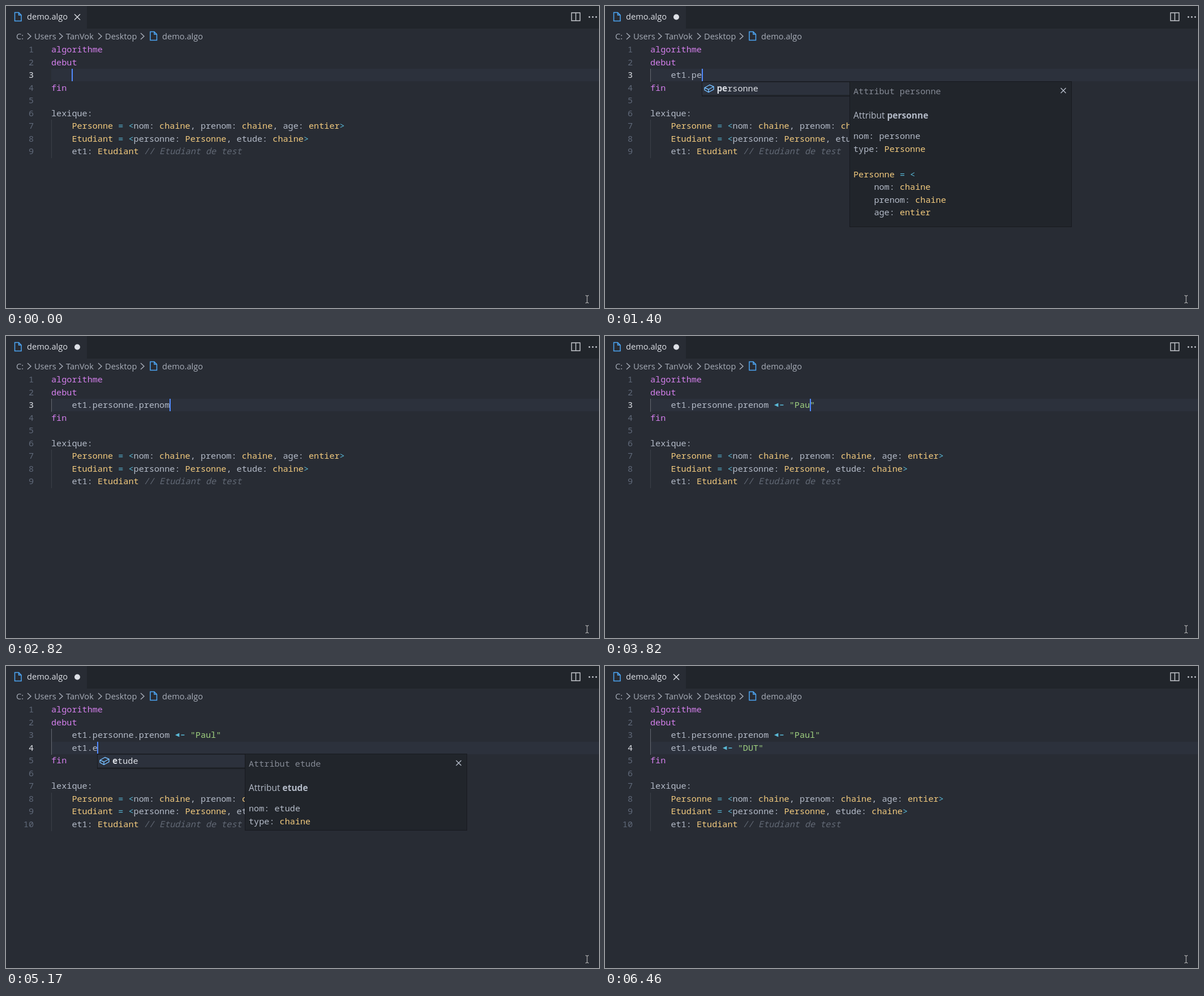
These frames come from a looping animation (1048x534 px, 6560 ms). An HTML page with a canvas:

```html
<!DOCTYPE html>
<html lang="fr">
<head>
<meta charset="utf-8">
<title>Autocompletion</title>
<style>
  html, body { margin: 0; width: 100%; height: 100%; overflow: hidden; background: #282c34; }
  canvas { display: block; }
</style>
</head>
<body>
<canvas id="stage" width="1048" height="534"></canvas>
<script>
const ctx = document.getElementById('stage').getContext('2d');
const LOOP = 6560, CHAR = 9.1, ROW = 22.5, LEFT = 80, TOP = 66;
const MONO_FAMILY = '"Noto Sans Mono", monospace';
const MONO = '500 15.17px ' + MONO_FAMILY;
const MONO_BOLD = 'bold 15.17px ' + MONO_FAMILY;
const UI = '"Open Sans", sans-serif';
const C = {
  bg: '#282c34', dark: '#21252b', line: '#2c313c', text: '#b4bbc8', bright: '#dde0e6',
  dim: '#858a95', keyword: '#d47fec', type: '#f2ca7e', op: '#5abbd9', string: '#9fd07f',
  comment: '#626975', number: '#5f6878', blue: '#4da6f5', border: '#181a1f'
};

// Completion entries: kind, documentation lines
const entries = {
  entier: ['Type', 'nom: entier', 'description: // Nombre entier'],
  Etudiant: ['Type'],
  ecrire: ['Template'],
  et1: ['Variable', 'nom: et1', 'type: Etudiant', 'description: // Etudiant de test', '',
    'Etudiant = <', '    personne: Personne', '    etude: chaine'],
  etude: ['Attribut', 'nom: etude', 'type: chaine'],
  personne: ['Attribut', 'nom: personne', 'type: Personne', '',
    'Personne = <', '    nom: chaine', '    prenom: chaine', '    age: entier'],
  age: ['Attribut', 'nom: age', 'type: entier'],
  nom: ['Attribut', 'nom: nom', 'type: chaine'],
  prenom: ['Attribut', 'nom: prenom', 'type: chaine']
};
const menus = {
  e: ['entier', 'et1', 'ecrire', 'Etudiant'],
  et: ['et1', 'Etudiant', 'entier'],
  student: ['etude', 'personne'],
  person: ['age', 'nom', 'prenom'],
  personne: ['personne'],
  etude: ['etude']
};

// Start time, edited text ("|" is the caret), menu, selected entry, documentation open
const done = 'et1.personne.prenom <- "Paul"\n';
const steps = [
  [0, '|'],
  [100, 'e|', 'e', 0, true],
  [300, 'et|', 'et', 0, true],
  [600, 'et1|'],
  [800, 'et1.|', 'student', 0, false],
  [900, 'et1.|', 'student', 0, true],
  [1100, 'et1.p|', 'personne', 0, true],
  [1300, 'et1.pe|', 'personne', 0, true],
  [1600, 'et1.personne|'],
  [1920, 'et1.personne.|', 'person', 0, false],
  [2020, 'et1.personne.|', 'person', 0, true],
  [2220, 'et1.personne.|', 'person', 1, true],
  [2420, 'et1.personne.|', 'person', 2, true],
  [2720, 'et1.personne.prenom|'],
  [2920, 'et1.personne.prenom |'],
  [3020, 'et1.personne.prenom <|'],
  [3120, 'et1.personne.prenom <-|'],
  [3320, 'et1.personne.prenom <- |'],
  [3420, 'et1.personne.prenom <- "|"'],
  [3620, 'et1.personne.prenom <- "P|"'],
  [3720, 'et1.personne.prenom <- "Pa|"'],
  [3820, 'et1.personne.prenom <- "Pau|"'],
  [3950, 'et1.personne.prenom <- "Paul|"'],
  [4050, 'et1.personne.prenom <- "Paul"|'],
  [4150, done + '|'],
  [4350, done + 'e|', 'e', 0, true],
  [4450, done + 'et|', 'et', 0, true],
  [4670, done + 'et1|'],
  [4870, done + 'et1.|', 'student', 0, false],
  [4970, done + 'et1.|', 'student', 0, true],
  [5070, done + 'et1.e|', 'etude', 0, false],
  [5170, done + 'et1.e|', 'etude', 0, true],
  [5270, done + 'et1.et|', 'etude', 0, true],
  [5370, done + 'et1.etude|'],
  [5470, done + 'et1.etude |'],
  [5570, done + 'et1.etude <|'],
  [5670, done + 'et1.etude <-|'],
  [5770, done + 'et1.etude <- |'],
  [5870, done + 'et1.etude <- "|"'],
  [5970, done + 'et1.etude <- "D|"'],
  [6070, done + 'et1.etude <- "DU|"'],
  [6170, done + 'et1.etude <- "DUT|"'],
  [6360, done + 'et1.etude <- "DUT"']
];

const icons = {
  cube: new Path2D('M-8-1L1-6L8-3V2L-1 7L-8 3ZM-8-1L-1 2L8-3M-1 2V7'),
  tree: new Path2D('M-7-2L-2-7L1-4L-4 1ZM-1-1H4M1-1V5H4M4-1l2-2 2 2-2 2zM4 5l2-2 2 2-2 2z'),
  brackets: new Path2D('M-5-5H-8V5H-5M5-5H8V5H5M-4 0L1-3L4-1V1L-1 4L-4 2ZM-4 0L-1 1L4-1'),
  square: new Path2D('M-7-7H7V7H-7Z'),
  file: new Path2D('M-5.5-7.5H1.5L6-3V7.5H-5.5ZM1.5-7.5V-3H6'),
  close: new Path2D('M-5-5L5 5M5-5L-5 5'),
  smallClose: new Path2D('M-4.5-4.5L4.5 4.5M4.5-4.5L-4.5 4.5'),
  chevron: new Path2D('M-3-5.5L3 0L-3 5.5'),
  split: new Path2D('M-7.5-7H7.5V7H-7.5ZM0-7V7'),
  beam: new Path2D('M-3-6.5H-1L0-5.5L1-6.5H3M0-5.5V5.5M-3 6.5H-1L0 5.5L1 6.5H3')
};
const kindIcons = {
  Attribut: ['cube', '#75beff'], Type: ['tree', '#ee9d28'],
  Variable: ['brackets', '#75beff'], Template: ['square', '#d8d8d8']
};

function rect(x, y, w, h, color) {
  ctx.fillStyle = color;
  ctx.fillRect(x, y, w, h);
}
function frame(x, y, w, h) {
  rect(x, y, w, h, C.border);
  rect(x + 1, y + 1, w - 2, h - 2, C.dark);
}
function dot(x, y, r, color) {
  ctx.fillStyle = color;
  ctx.beginPath();
  ctx.arc(x, y, r, 0, 7);
  ctx.fill();
}
function icon(name, x, y, color, width = 1.4) {
  ctx.save();
  ctx.translate(x, y);
  ctx.strokeStyle = color;
  ctx.lineWidth = width;
  if (name === 'square') ctx.setLineDash([1.5, 1]);
  ctx.stroke(icons[name]);
  ctx.restore();
}
function label(text, x, y, color, font = MONO, align = 'left') {
  ctx.font = font;
  ctx.fillStyle = color;
  ctx.textAlign = align;
  ctx.fillText(text, x, y);
}

function arrow(x, y) {
  ctx.fillStyle = C.op;
  ctx.beginPath();
  ctx.moveTo(x + 0.5, y - 5);
  ctx.lineTo(x + 8, y - 8.5);
  ctx.lineTo(x + 8, y - 1.5);
  ctx.fill();
  ctx.fillRect(x + 11, y - 5.7, 6, 1.5);
}

const tokens = /\/\/.*|"[^"]*"|<-|[<>=]|\w+|[^\w\s]/g;
function tokenColor(token) {
  if (token.startsWith('//')) return C.comment;
  if (token[0] === '"') return C.string;
  if (/^[<>=]/.test(token)) return C.op;
  if (/^(algorithme|debut|fin)$/.test(token)) return C.keyword;
  if (/^(Personne|Etudiant|chaine|entier)$/.test(token)) return C.type;
  return C.text;
}
function code(text, x, y) {
  for (const match of text.matchAll(tokens)) {
    const token = match[0], tx = x + match.index * CHAR;
    if (token === '<-') arrow(tx, y);
    else label(token, tx, y, tokenColor(token), (token.startsWith('//') ? 'italic ' : '') + MONO);
  }
}

function drawHeader(dirty) {
  rect(0, 0, 1048, 40, C.dark);
  rect(0, 0, 143, 40, C.bg);
  icon('file', 21, 19, C.blue, 1.5);
  label('demo.algo', 37, 24, C.bright, '14.6px ' + UI);
  if (dirty) dot(126, 19.5, 5, C.bright);
  else icon('close', 126, 19.5, C.bright);
  icon('split', 1007, 19, '#c5c8ce');
  for (const x of [1031, 1037, 1043]) dot(x, 19.5, 1.4, '#c5c8ce');

  const crumbs = [['C:', 18], ['Users', 50], ['TanVok', 106], ['Desktop', 175], ['demo.algo', 276]];
  for (const [text, x] of crumbs) label(text, x, 59, '#a8aeb9', '14.6px ' + UI);
  for (const x of [41, 97, 166, 241]) icon('chevron', x, 53.5, '#a8aeb9');
  icon('file', 260.5, 53, C.blue, 1.5);
}

function drawDoc(x, y, name) {
  const [kind, ...lines] = entries[name];
  const height = lines.length > 2 ? 258 : 136;
  frame(x, y, 393, height);
  label(kind + ' ' + name, x + 7, y + 23, C.dim);
  icon('smallClose', x + 378, y + 16.5, C.text);
  label(kind + ' ', x + 7, y + 65.5, C.text, '15.5px ' + UI);
  label(name, x + 7 + ctx.measureText(kind + ' ').width, y + 65.5, C.text, 'bold 15.5px ' + UI);
  lines.forEach((line, i) => code(line, x + 7, y + 102 + i * ROW));
}

function drawMenu(x, y, items, selected, open, prefix) {
  frame(x, y, 262, items.length * ROW + 4.5);
  items.forEach((name, i) => {
    const top = y + 2 + i * ROW, kind = entries[name][0], [shape, tint] = kindIcons[kind];
    if (i === selected) rect(x + 1, top, 260, 22, C.line);
    icon(shape, x + 13, top + 10.5, tint);
    const color = i === selected ? C.bright : C.text;
    const hit = name.toLowerCase().startsWith(prefix) ? prefix.length : 0;
    label(name.slice(0, hit), x + 27, top + 16, C.bright, MONO_BOLD);
    label(name.slice(hit), x + 27 + hit * CHAR, top + 16, color);
    if (kind === 'Template')
      label('Template de [ecri…', x + 110, top + 15.5, C.dim, '12.9px ' + MONO_FAMILY);
  });
  if (open) drawDoc(x + 261, y, items[selected]);
}

function draw(time) {
  const [, text, menu, selected, open] = steps.findLast(step => step[0] <= time);
  const edited = text.split('\n');
  const active = 1 + edited.length;
  const caret = edited[edited.length - 1].indexOf('|');
  const lines = ['algorithme', 'debut',
    ...edited.map(line => '    ' + line.replace('|', '')),
    'fin', '', 'lexique:',
    '    Personne = <nom: chaine, prenom: chaine, age: entier>',
    '    Etudiant = <personne: Personne, etude: chaine>',
    '    et1: Etudiant // Etudiant de test'];
  const rowTop = i => Math.round(TOP + i * ROW);

  rect(0, 0, 1048, 534, C.bg);
  drawHeader(time >= 100 && time < 6460);
  rect(LEFT, rowTop(active), 968, 22, C.line);
  lines.forEach((line, i) => {
    const y = rowTop(i), inBody = i <= active;
    label(i + 1, 49, y + 16, i === active ? C.bright : C.number, MONO, 'right');
    if (line.startsWith('    ') && !(inBody && text === '|'))
      rect(LEFT, y, 1, 23, inBody ? '#646972' : '#3b4048');
    code(line, LEFT, y + 16);
  });

  if (caret >= 0) {
    const x = Math.floor(LEFT + (4 + caret) * CHAR);
    rect(x, rowTop(active), 2, 22, '#528bff');
    if (menu) {
      const prefix = edited[edited.length - 1].slice(0, caret).match(/\w*$/)[0];
      drawMenu(x, rowTop(active + 1) - 1, menus[menu], selected, open, prefix);
    }
  }
  icon('beam', 1027, 518.5, '#c8c8c8', 1);
}

function tick() {
  draw(performance.now() % LOOP);
  requestAnimationFrame(tick);
}
tick();
</script>
</body>
</html>
```
